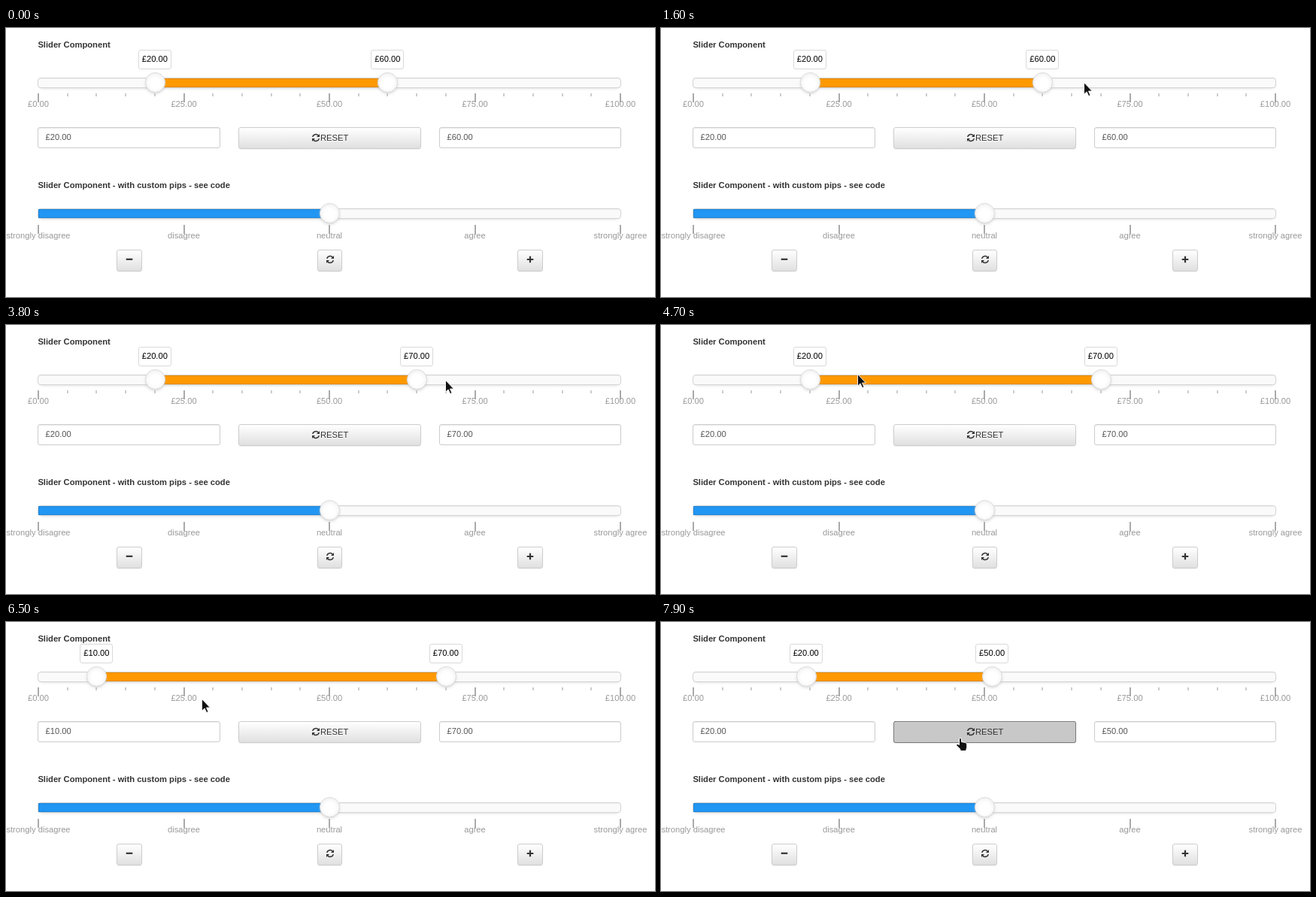
Animation, 863 px wide and 358 px high, one loop 8000 ms. Source, as an HTML page:

```html
<!DOCTYPE html>
<html lang="en">
<head>
<meta charset="utf-8">
<title>Slider Component</title>
<style>
html, body { margin: 0; width: 100%; height: 100%; overflow: hidden; background: #fff; }
body { position: relative; font: 11.2px "Liberation Sans", Arial, sans-serif; color: #333; }
body *, svg { position: absolute; box-sizing: border-box; white-space: nowrap; }
svg * { position: static; }
h2 { margin: 0; left: 42.4px; font-size: 11.2px; line-height: 16px; }

.track {
  left: 42px; width: 776px; height: 14px;
  background: #fafafa; border: 1px solid #d3d3d3; border-radius: 4px;
  box-shadow: inset 0 1px 1px #f0f0f0, 0 3px 5px -4px #bbb;
}
.fill { height: 12px; box-shadow: inset 0 0 2px rgba(51, 51, 51, .45); }
.knob {
  width: 27px; height: 27px; margin-left: -13px;
  border: 1px solid #d9d9d9; border-radius: 50%; background: #fff;
  box-shadow: inset 0 0 1px #fff, inset 0 1px 6px #ebebeb, 0 2px 5px -2px #bbb;
}
.tip {
  top: 29px; width: 44px; height: 26px; margin-left: -22px;
  border: 1px solid #d9d9d9; border-radius: 3px; background: #fff;
  color: #000; line-height: 22px; text-align: center;
}
.tick { width: 2px; height: 4px; margin-left: -1px; background: #ccc; }
.tick.large { height: 12px; background: #aaa; }
.label { width: 120px; margin-left: -60px; line-height: 16px; text-align: center; color: #999; }

.field {
  top: 132px; height: 28px; padding-left: 9.6px;
  border: 1px solid #ccc; border-radius: 3px; line-height: 24px; color: #555;
  box-shadow: inset 0 1px 1px rgba(0, 0, 0, .075);
}
.btn {
  border: 1px solid #ccc; border-radius: 3px;
  background: linear-gradient(#fff, #e0e0e0);
  box-shadow: inset 0 1px 0 rgba(255, 255, 255, .15), 0 1px 1px rgba(0, 0, 0, .05);
}
.small { top: 295px; width: 34px; height: 29px; }
.small svg { left: 10px; top: 6px; }
#reset { left: 309px; top: 132px; width: 243px; height: 29px; }
#reset svg { left: 96px; top: 7px; }
#reset span { left: 108px; line-height: 27px; text-shadow: 0 1px 0 rgba(255, 255, 255, .8); }
#reset.hover { background: #c8c8c8; border-color: #adadad; }
#reset.hover span { text-shadow: none; }
#reset.focus { outline: 1px dotted #444; outline-offset: -1px; }
#reset.down { box-shadow: inset 0 2px 4px rgba(0, 0, 0, .18); }
#cursor { left: 0; top: 0; overflow: visible; }
</style>
</head>
<body>
<svg width="0" height="0">
  <defs>
    <g id="half">
      <path d="M-4.3 -1.1A4.3 4.3 0 0 1 3.2 -2.9" fill="none" stroke="#333" stroke-width="1.6"/>
      <path d="M5 -5V-.9H.9Z" fill="#333"/>
    </g>
    <g id="refresh"><use href="#half"/><use href="#half" transform="rotate(180)"/></g>
  </defs>
</svg>

<h2 style="top:14px">Slider Component</h2>
<div class="track" style="top:66px"><div class="fill" id="range" style="background:#f90"></div></div>
<div id="pips"></div>
<div class="knob" id="lowKnob" style="top:59px"></div>
<div class="knob" id="highKnob" style="top:59px"></div>
<div class="tip" id="lowTip"></div>
<div class="tip" id="highTip"></div>

<div class="field" id="lowField" style="left:42px;width:243px"></div>
<div class="btn" id="reset">
  <svg width="12" height="12" viewBox="-6 -6 12 12"><use href="#refresh"/></svg>
  <span>RESET</span>
</div>
<div class="field" id="highField" style="left:576px;width:242px"></div>

<h2 style="top:201px">Slider Component - with custom pips - see code</h2>
<div class="track" style="top:240px">
  <div class="fill" style="width:387px;background:#2196f3"></div>
</div>
<div class="knob" style="top:233px;left:430px"></div>

<div class="btn small" style="left:147px">
  <svg width="12" height="12" viewBox="-6 -6 12 12"><path d="M-4.3 -.2H4.3" stroke="#333" stroke-width="2.2"/></svg>
</div>
<div class="btn small" style="left:414px;width:33px">
  <svg width="12" height="12" viewBox="-6 -6 12 12"><use href="#refresh"/></svg>
</div>
<div class="btn small" style="left:680px">
  <svg width="12" height="12" viewBox="-6 -6 12 12"><path d="M-4.3 0H4.3M0 -4.3V4.3" stroke="#333" stroke-width="2.2"/></svg>
</div>

<svg id="cursor" width="18" height="22">
  <path id="arrow" d="M.5 .5V16.2L4.1 12.9L6.7 18.6L9 17.6L6.5 12H11.4Z"
    fill="#111" stroke="#fff" stroke-width=".9"/>
  <path id="hand" d="M4.5 9.5V2Q4.5 .5 6 .5T7.6 2V5.5L12.8 6.5Q14.8 7 14.8 9V13L13.5 17.5H6.3L5.6 15L1 10.4Q.3 8.6 2 8.2Z"
    fill="#111" stroke="#fff" stroke-width="1"/>
</svg>

<script>
const LOOP = 8000, STEP = 100;
const $ = id => document.getElementById(id);
const place = v => 43 + 7.74 * v;
const money = v => '£' + v.toFixed(2);

function add(cls, x, y, text = '') {
  const el = document.createElement('div');
  el.className = cls;
  el.style.left = x + 'px';
  el.style.top = y + 'px';
  el.textContent = text;
  $('pips').append(el);
}

const answers = ['strongly disagree', 'disagree', 'neutral', 'agree', 'strongly agree'];
for (let v = 0; v <= 100; v += 5) {
  const large = v % 25 === 0, x = place(v);
  add(large ? 'tick large' : 'tick', x, 87);
  if (large) {
    add('label', x, 93, money(v));
    add('tick large', x, 262);
    add('label', x, 268, answers[v / 25]);
  }
}

// CSS "ease" curve, solved by bisection
function ease(x) {
  if (x <= 0) return 0;
  if (x >= 1) return 1;
  const bez = (s, a, b) => 3 * (1 - s) ** 2 * s * a + 3 * (1 - s) * s * s * b + s ** 3;
  let lo = 0, hi = 1;
  for (let i = 0; i < 24; i++) {
    const mid = (lo + hi) / 2;
    if (bez(mid, .25, .25) < x) lo = mid; else hi = mid;
  }
  return bez(lo, .1, 1);
}

// [start, low value, high value]; each change glides for 300 ms
const moves = [
  [-1000, 20, 60], [2170, 20, 65], [3798, 20, 70], [5645, 10, 70], [7694, 20, 50]
];

// [time, x, y] of the pointer
const path = [
  [400, 29, 74], [500, 230, 70], [600, 358, 74],
  [900, 361, 74], [1000, 382, 71], [1100, 425, 67], [1200, 475, 65],
  [1300, 518, 69], [1400, 545, 78], [1500, 558, 75], [1600, 562, 72],
  [3000, 566, 73], [3100, 574, 73], [3200, 581, 73], [3300, 584, 73],
  [4500, 540, 71], [4600, 400, 66], [4700, 261, 65], [4800, 190, 69],
  [4900, 150, 78], [5000, 132, 77], [5100, 128, 76], [5400, 128, 75],
  [6300, 140, 77], [6400, 190, 86], [6500, 260, 102],
  [6600, 335, 125], [6700, 385, 150], [6800, 392, 154]
];

const latest = (rows, t) => rows.findLastIndex(row => row[0] <= t);

function drawSlider(t) {
  const i = latest(moves, t);
  const [start, low, high] = moves[i];
  const from = moves[Math.max(0, i - 1)];
  const k = ease((t - start) / 300);
  const x1 = place(from[1] + (low - from[1]) * k);
  const x2 = place(from[2] + (high - from[2]) * k);
  for (const [name, x, value] of [['low', x1, low], ['high', x2, high]]) {
    $(name + 'Knob').style.left = $(name + 'Tip').style.left = x + 'px';
    $(name + 'Tip').textContent = $(name + 'Field').textContent = money(value);
  }
  $('range').style.left = x1 - 43 + 'px';
  $('range').style.width = x2 - x1 + 'px';
}

function drawPointer(t) {
  const i = latest(path, t), over = t >= 6700;
  $('cursor').style.display = i < 0 ? 'none' : '';
  if (i >= 0) $('cursor').style.transform = `translate(${path[i][1]}px, ${path[i][2]}px)`;
  $('arrow').style.display = over ? 'none' : '';
  $('hand').style.display = over ? '' : 'none';
  const button = $('reset').classList;
  button.toggle('hover', over);
  button.toggle('focus', t >= 7500);
  button.toggle('down', t >= 7500 && t < 7700);
}

const begin = performance.now();
function frame() {
  const t = Math.floor((performance.now() - begin) % LOOP / STEP) * STEP;
  drawSlider(t);
  drawPointer(t);
  requestAnimationFrame(frame);
}
frame();
</script>
</body>
</html>
```
